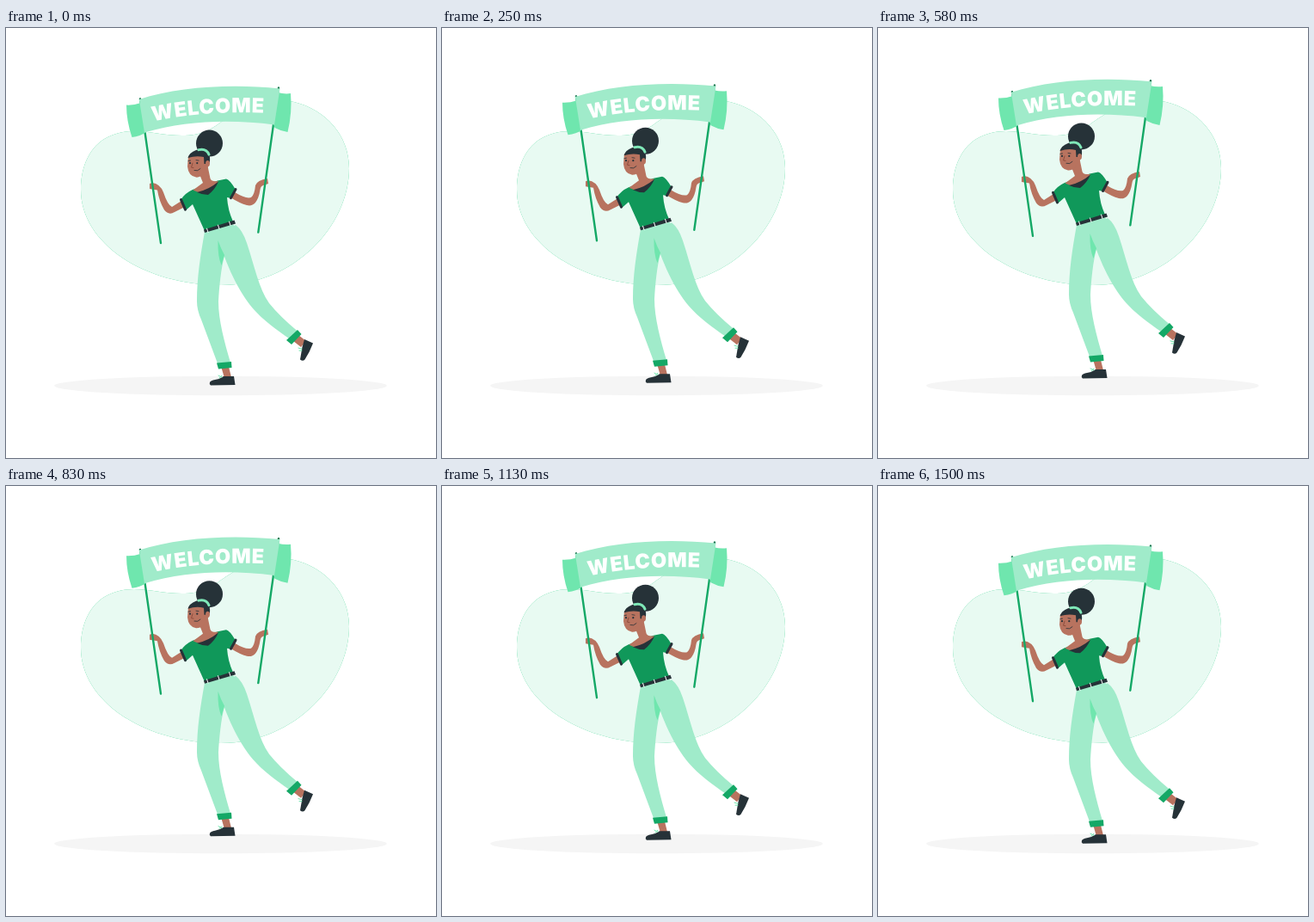
An HTML page for the animation above (1540 ms loop, 500 by 500 pixels).

```html
<!DOCTYPE html>
<html lang="en">
<head>
<meta charset="utf-8">
<title>Welcome</title>
<style>
  html, body { margin: 0; height: 100%; overflow: hidden; background: #fff; }
  svg { display: block; width: 100%; height: 100%; }
  .dark { fill: #263238; }
  .skin { fill: #b8735f; }
  .mint { fill: #a0ebca; }
  .mid { fill: #6fe6ae; }
  .green { fill: #14a866; }
  .shirt { fill: #10985a; }
  .line { fill: none; stroke-linecap: round; }
  text { font: 900 23.5px Inter, sans-serif; letter-spacing: .75px; fill: #fff; }
</style>
</head>
<body>
<svg viewBox="0 0 500 500">
  <defs>
    <path id="blob" d="M118 127C148 112 174 126 208 125C235 124 245 112 258 104C280 90 304 78 335 86C372 95 399 125 399 163C399 230 335 299 250 299C160 299 87 250 87 188C87 160 98 137 118 127Z"/>
    <path id="baseline" d="M171 108.5C210 100 255 96 312 99"/>
  </defs>

  <use href="#blob" fill="#11c877"/>
  <use href="#blob" fill="#fff" fill-opacity=".9"/>
  <ellipse cx="249.5" cy="416" rx="193.5" ry="11.3" fill="#f5f5f5"/>

  <g id="figure">
    <!-- raised leg -->
    <path class="skin" d="M334 364L340 357L349 364L343 371Z"/>
    <path class="dark" d="M347 362L357 366.5Q353 377 347.5 385.5Q345 388 342 385.5L344.5 371Z"/>
    <path class="line" stroke="#6fe6ae" d="M340 372l4 1M341 375l3 0"/>
    <path class="mint" d="M246 240C255 275 271 307 287 326C299 340 315 351 329 361L339 352.5Q318 335 306 320C294 303 289 277 280 250Q275 235 267 229Z"/>
    <path class="green" d="M326 363L339 351L343.5 356L332 368Z"/>

    <!-- standing leg -->
    <path class="skin" d="M250.5 395L259 394L262 406L254 407Z"/>
    <path class="dark" d="M237 412Q238 410 243 409Q249 408 253 405L265 405L266.5 415L238 415.5Q236 414 237 412Z"/>
    <path class="line" stroke="#6fe6ae" d="M247 404l4 2M248 407l3-3"/>
    <path class="mint" d="M231 237C226 265 222 290 222 318Q222 328 227 339L246 390L261 389C254 365 247 340 247 318C248 300 250 280 254 265L268 235L264 228Z"/>
    <path class="mid" d="M246.5 247Q250 257 254 264L250.5 276Q246 266 246.5 247Z"/>
    <path class="green" d="M245 389.5L262 388L262.5 395L247 396.5Z"/>

    <!-- arms -->
    <path class="skin" d="M204 201L193 208Q188 206 183 191Q179 181 170 180L167 181L167 187L176 188.5Q178 201 184 211.5Q189 218 196 214L208 208Z"/>
    <path class="skin" d="M266 191Q279 199 285 197Q289 194 290 183Q292 177 304 175L305 181L299 183Q296 184 295.5 188Q294 198 290 203Q286 207.5 280 206Q272 204 261 197Z"/>

    <!-- torso -->
    <path class="shirt" d="M217 188Q208 192 203 200L209 212L217 205L231 236L264 225Q258 212 257 197L262 198L267 188Q260 176 256 175.5L246 177.5Z"/>
    <path class="line" stroke="#263238" stroke-width="3" stroke-linecap="butt" d="M203.5 199.5L208.5 211M267 187.500L261.5 197.5"/>
    <path class="skin" d="M225 170L229 180L217.5 188.5L226 192L242 186L247 178Q239 179 237.5 175L234 158Z"/>
    <path class="dark" d="M222 191Q236 188 247 178.5Q243 188 235 194Q228 194 222 191Z"/>
    <path class="dark" d="M230 234.5L265.5 223.5L267 227.5L231 238Z"/>
    <path class="line" stroke="#fff" d="M233.5 233l1.5 4.5M246.5 229l1.5 4.5M259.5 225l1.5 4.5"/>

    <!-- head -->
    <circle class="dark" cx="236.5" cy="134" r="15.5"/>
    <path class="skin" d="M212 149L211 161Q212 172 221 173.5Q228 174 231 167L236 160L234 147L222 145Z"/>
    <path class="dark" d="M211.5 151Q213 145 221 142Q231 139 236 147Q238 152 236.5 158L230.5 158L230 150Q221 148 211.5 151Z"/>
    <ellipse class="skin" cx="234.5" cy="157.5" rx="2.5" ry="3.5"/>
    <path class="line" stroke="#7fe8b8" stroke-width="3" stroke-linecap="butt" d="M224 141.5Q233 139.5 236 147"/>
    <circle class="dark" cx="214" cy="157" r="1.1"/>
    <circle class="dark" cx="222.3" cy="157" r="1.1"/>
    <path class="line" stroke="#263238" stroke-width=".8" d="M212 154.5l2.5-.5M221 153.5l3 .5M219 165.5Q223 167 226 163.5"/>
    <path class="line" stroke="#8f4d3d" d="M217 157L215.5 162L218 162.5"/>

    <!-- banner -->
    <path class="line" stroke="#14a866" stroke-width="2.4" d="M156 82.5L180 250M317 69.5L293.3 237.5"/>
    <path class="line" stroke="#176b4a" stroke-width="2.2" d="M156 82.2l.1.8M317 69.5l-.1.8"/>
    <path class="mid" d="M140 89.5Q148 90 157 87L163 121Q156 126 146.5 127Q140 108 140 89.5Z"/>
    <path class="mid" d="M316 75Q324 77 331 76Q333 98 327.5 121Q320 120 312.5 116L311 112Z"/>
    <path class="mint" d="M154.8 82.8C200 68.5 260 64.5 318.5 70.3L312 112.3C262 106 210 107 161 121.5Z"/>
    <text><textPath href="#baseline">WELCOME</textPath></text>
  </g>
</svg>
<script>
  const PERIOD = 1540, LOWEST = 1490, SWING = 4.5;
  const figure = document.getElementById('figure');
  const start = performance.now();

  function draw() {
    const phase = (performance.now() - start - LOWEST) / PERIOD * 2 * Math.PI;
    const y = 0.2 - SWING * (1 - Math.cos(phase));
    figure.setAttribute('transform', `translate(0 ${y.toFixed(3)})`);
    requestAnimationFrame(draw);
  }
  draw();
</script>
</body>
</html>
```
